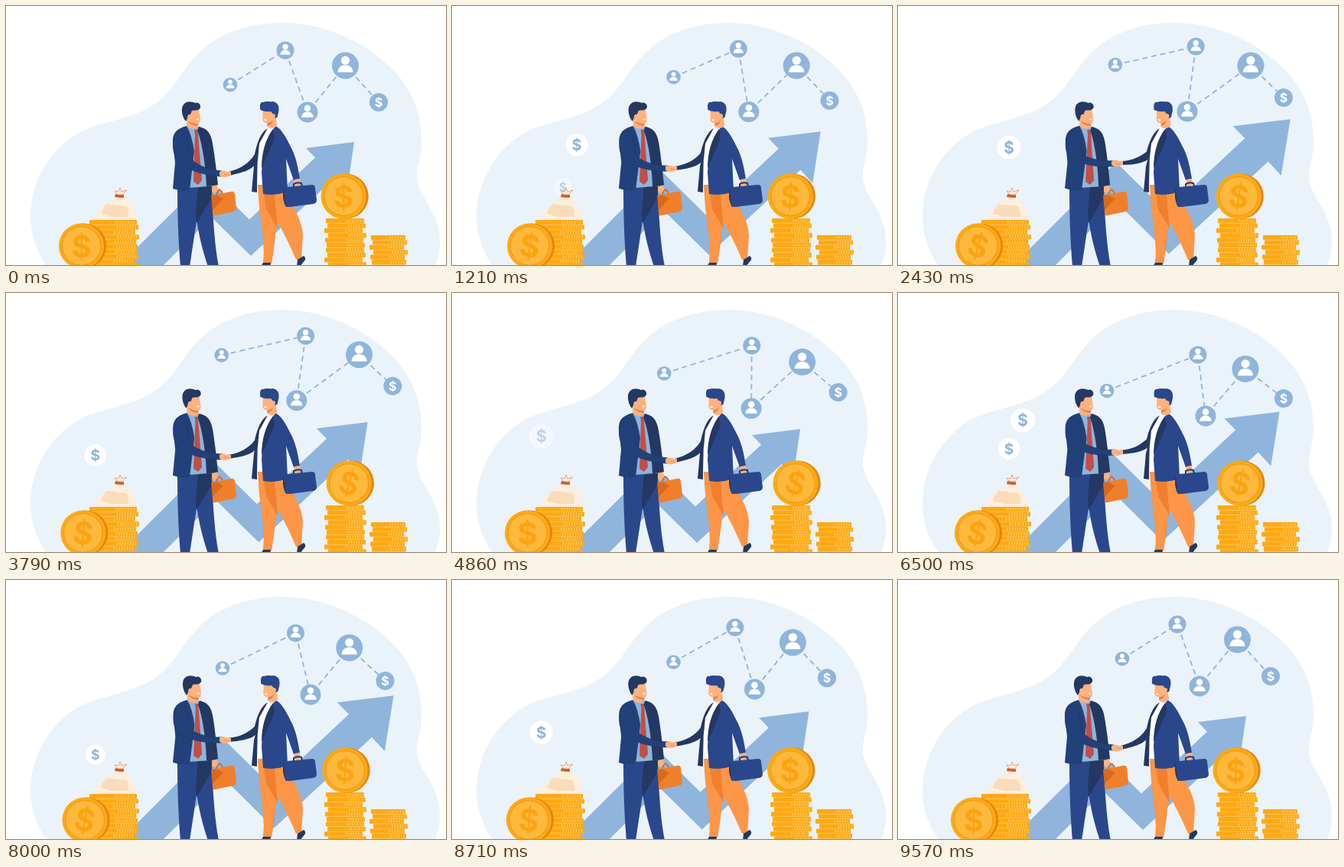
Recreate the animation shown at these times as an HTML page. Size 575 by 339 pixels, loop 9.64 s.

```html
<!DOCTYPE html>
<html lang="en">
<head>
<meta charset="utf-8">
<title>Business deal</title>
<style>
  html, body { margin: 0; width: 100%; height: 100%; overflow: hidden; background: #fff; }
  svg { display: block; width: 100vw; height: 100vh; }
  text { font-family: Inter, Roboto, sans-serif; font-weight: 700; text-anchor: middle; }
  .sky { fill: #8fb5dc; }
  .navy { fill: #233862; }
  .coat { fill: #22417a; }
  .blue { fill: #2b478b; }
  .skin { fill: #ffb27d; }
  .white { fill: #fff; }
  .links { fill: none; stroke: #8fb5dc; stroke-width: 1.8; stroke-dasharray: 7 5; }
</style>
</head>
<body>
<svg viewBox="0 0 575 339">
  <path fill="#eaf2fa" d="M56 345C40 322 32 300 32 275C32 228 62 178 108 160C145 147 177 145 206 119C229 97 237 68 273 45C298 29 329 22 362 22C420 22 480 52 514 93C535 119 543 148 543 177C543 200 536 208 537 226C539 249 567 270 567 308C567 322 564 333 558 345Z"/>

  <polygon id="arrow" class="sky"/>

  <path id="links" class="links"/>
  <g id="nodes"></g>
  <g id="floats"></g>

  <g id="sack">
    <path fill="#fdeedd" d="M143 250H154C163 257 171 268 170 280H115C116 268 132 260 143 250Z"/>
    <path fill="#f9dcbc" d="M131 259L157 262C160 266 160 271 160 276H138L124 272C125 268 128 263 131 259Z"/>
    <path fill="#fdeedd" stroke="#e08a50" stroke-width=".7" d="M146 247L142 242L147 243L149 238L151 243L158 241L152 247Z"/>
    <path fill="#cf5f24" d="M143 246Q149 248 154 247L154 251Q148 251 142 250Z"/>
  </g>
  <g id="stacks"></g>

  <!-- left man -->
  <g id="legsL">
    <path class="blue" d="M224 237L252 236L250 275L240 341H228C225 308 224 270 224 237Z"/>
    <path class="blue" d="M249 237H269C270 270 272 310 278 341H264C256 318 251 296 248 270Z"/>
    <path class="navy" d="M251 236H269L268 252L249 284L248 270Z"/>
  </g>
  <g id="caseL">
    <path fill="none" stroke="#d96a1d" stroke-width="2" d="M275 247L277 241Q280 239 283 245"/>
    <path fill="#f07f2c" d="M269 248L294 243Q298 242 299 246L301 264Q301 268 298 269L274 274Q270 275 270 271Z"/>
    <path fill="#d96a1d" d="M268 248L274 247L284 252L270 267Z"/>
    <path class="skin" d="M269 234H276L277 241L273 245L269 243Z"/>
  </g>
  <g id="manL">
    <path class="sky" d="M236 157L254 158L264 236L239 238Z"/>
    <path fill="#c04f48" d="M246 162H250L251 168L256 228L251 234L245 230L247 168Z"/>
    <path class="coat" d="M236 157C224 160 217 166 218 179L221 205L218 239Q228 243 240 241L246 190Q243 169 236 157Z"/>
    <path class="navy" d="M252 158C264 160 268 168 270 180C273 198 275 216 277 234Q270 236 262 236C261 212 257 180 250 163Z"/>
    <path class="skin" d="M236 148L252 151L251 158Q244 164 236 157Z"/>
    <path fill="#e6824e" d="M238 151L251 153L250 157Q241 156 238 151Z"/>
    <path class="skin" d="M237 136H252L254 148Q254 154 249 154Q240 154 236 147Z"/>
    <path class="navy" d="M235 151C230 145 228 134 232 129C236 124 243 125 247 127C251 125 255 129 254 133C252 138 246 136 243 137L241 142Q237 141 237 147Z"/>
    <path class="white" d="M248 148L252 147.500Q251.500 151 248 148Z"/>
    <path id="armL" class="coat" stroke="#233862" stroke-width=".8"/>
  </g>

  <!-- right man -->
  <g id="legsR">
    <path fill="#f08030" d="M329 232L356 240L354 274C353 298 350 318 347 337H336C339 314 334 289 331 262Z"/>
    <path fill="#fd9646" d="M330 232H336Q345 250 355 284C350 305 349 320 347 337H336C339 314 334 289 331 262Z"/>
    <path fill="#fd9646" d="M337 243L368 241C371 262 387 276 388 300L386 332H379C372 314 356 283 346 268Z"/>
    <path fill="#f08030" d="M337 246L351 246L355 292L340 266Z"/>
    <path class="navy" d="M336 336H346L345 343H332ZM381 332L389 327Q394 331 388 336L384 341H380Z"/>
  </g>
  <g id="bodyR">
    <path class="white" d="M341 158L329 180L329 234L338 234L348 164Z"/>
    <path class="navy" d="M329 190L328 232V244L321 243L324 210Z"/>
    <path class="blue" d="M352 157C361 161 368 176 374 188C380 201 382 215 384 226L376 228L366 200L368 242Q355 249 336 246L334 218C335 195 341 174 352 157Z"/>
    <path class="navy" d="M349 161L351 173L340 199L334 212C334 192 339 174 349 161Z"/>
    <path class="skin" d="M377 227L384 226L385 233L380 237L376 233Z"/>
    <path fill="none" stroke="#233862" stroke-width="2" d="M376 237V233Q381 230 386 232L387 236"/>
    <path class="navy" d="M362 240L371 238L374 262L366 263Q363 259 362 250Z"/>
    <path class="blue" d="M363 241Q363 238 367 237L400 234Q404 234 404 238L406 254Q406 258 402 259L371 263Q366 263 365 259Z"/>
  </g>
  <path id="armR" class="navy"/>
  <g id="headR">
    <path class="skin" d="M343 148L353 145L355 156Q350 163 342 158Z"/>
    <path fill="#e6824e" d="M342 153L350 149L347 155L342 157Z"/>
    <path class="skin" d="M336.500 137H353L352 146Q348 154 341 153Q336 153 336 147Z"/>
    <path class="blue" d="M333 136C332 130 333 125 337 126C341 124 345 126 349 125C356 126 358 131 357 138L355 146L352 147Q354 140 349 141L347 138Q339 139 333 136Z"/>
    <path class="white" d="M338 148L342 149Q339 152 338 148Z"/>
  </g>
  <g id="hands" class="skin">
    <path d="M279 217Q284 214 289 217L294 217V222L288 224Q283 225 279 222Z"/>
    <path fill="none" stroke="#e6824e" stroke-width=".8" d="M285 220L291 221"/>
  </g>
  <g id="coins"></g>
</svg>
<script>
const $ = id => document.getElementById(id);
const TAU = Math.PI * 2;
const LOOP = 9640;

function add(parent, tag, attrs, text) {
  const el = document.createElementNS('http://www.w3.org/2000/svg', tag);
  for (const k in attrs) el.setAttribute(k, attrs[k]);
  if (text) el.textContent = text;
  parent.appendChild(el);
  return el;
}
const dollar = (parent, size, fill) =>
  add(parent, 'text', { y: size * 0.363, 'font-size': size, fill }, '$');
const move = (el, x, y, rest = '') => el.setAttribute('transform', `translate(${x} ${y}) ${rest}`);

const clamp = v => Math.min(1, Math.max(0, v));
const sine = p => (1 - Math.cos(Math.PI * clamp(p))) / 2;
const cubic = p => p < 0.5 ? 4 * p ** 3 : 1 - 4 * (1 - p) ** 3;
const mix = (a, b, p) => a + (b - a) * p;

// Stacks of coins
function stack(x, y, w, count) {
  for (let i = 0; i < count; i++) {
    const left = x + [2, 4, 0, 5, 1, 3][i % 6], top = y + i * 6.4;
    add($('stacks'), 'rect', { x: left, y: top, width: w, height: 6.2, rx: 1.3, fill: '#fda914' });
    add($('stacks'), 'path', {
      d: `M${left} ${top + 6.2}h${w}`, stroke: '#fec65a', 'stroke-width': 0.5
    });
    add($('stacks'), 'path', {
      d: `M${left + w * 0.55} ${top + 3}h${w * 0.42}`,
      stroke: '#fed27c', 'stroke-width': 3.4, 'stroke-dasharray': '1 2.4'
    });
  }
}
stack(107, 280, 62, 10);
stack(416, 278, 50, 10);
stack(475, 300, 45, 7);

// Large rolling coins
function coin() {
  const g = add($('coins'), 'g', {});
  add(g, 'circle', { cx: 1.6, r: 29.6, fill: '#e5850f' });
  add(g, 'circle', { cx: -1.4, r: 29.6, fill: '#fda914' });
  add(g, 'circle', { cx: -1.4, r: 25.3, fill: '#feb93d', stroke: '#ee970f', 'stroke-width': 1 });
  const face = add(g, 'g', {});
  dollar(face, 40, '#fba312');
  return { g, face };
}
const coinL = coin(), coinR = coin();
function roll(c, x, y, angle) {
  move(c.g, x, y);
  move(c.face, -1.4, 0, `rotate(${angle})`);
}

// Network nodes: radius, then one stop per key time
const stopTimes = [0, 3, 6.4, 9.6];
const nodes = [
  [9.3, [293, 103], [283, 74.5], [273, 128]],
  [11.5, [365, 58], [391.5, 52.5], [392, 81]],
  [13.5, [394, 139], [376.5, 137.8], [402, 161]],
  [17.5, [443.5, 78], [462.6, 78], [454, 99.5]],
  [12, [487, 126], [505.5, 119.5], [504, 138]]
].map(([r, ...stops], i) => {
  const el = add($('nodes'), 'g', {});
  add(el, 'circle', { r, class: 'sky' });
  if (i === 4) dollar(el, 16, '#fff');
  else {
    const icon = add(el, 'g', { class: 'white', transform: `scale(${r})` });
    add(icon, 'circle', { cy: -0.39, r: 0.32 });
    add(icon, 'path', { d: 'M-.57 .5C-.57 -.22 .57 -.22 .57 .5Z' });
  }
  return { r, stops, el };
});

function network(t) {
  const leg = t < stopTimes[1] ? 0 : t < stopTimes[2] ? 1 : 2;
  const p = sine((t - stopTimes[leg]) / (stopTimes[leg + 1] - stopTimes[leg]));
  const at = nodes.map(({ stops, el }) => {
    const a = stops[leg], b = stops[(leg + 1) % 3];
    const x = mix(a[0], b[0], p), y = mix(a[1], b[1], p);
    move(el, x, y);
    return [x, y];
  });
  let d = '';
  for (let i = 0; i < 4; i++) {
    const [x, y] = at[i], dx = at[i + 1][0] - x, dy = at[i + 1][1] - y;
    const len = Math.hypot(dx, dy), s = (nodes[i].r + 3) / len, e = 1 - nodes[i + 1].r / len;
    d += `M${x + dx * s} ${y + dy * s}L${x + dx * e} ${y + dy * e}`;
  }
  $('links').setAttribute('d', d);
}

// Rising dollars: x, base y, birth times
const floats = [
  [163, 232, 0.25, 4.95],
  [145, 247, 1.06, 5.72],
  [116.7, 256, 3, 7.55]
].map(([x, y, ...births]) => {
  const el = add($('floats'), 'g', {});
  add(el, 'circle', { r: 16, class: 'white' });
  dollar(el, 21.5, '#8fb5dc');
  return { x, y, births, el };
});

function rise(t) {
  for (const { x, y, births, el } of floats) {
    const age = t - (t >= births[1] ? births[1] : births[0]);
    const p = clamp(age / 2), e = 1 - (1 - p) ** 2;
    move(el, x, y - 68.7 * e, `scale(${(11 + 5 * e) / 16})`);
    el.setAttribute('opacity', Math.min(clamp(age / 0.3), clamp((2 - age) / 0.27)));
  }
}

// Arrow corners, short and long
const shortArrow = [
  [138, 349], [263, 225], [318, 279.5], [404, 198.5], [392, 186], [455, 178],
  [446, 240], [430.7, 224], [320, 327], [268.5, 276.5], [190, 355]
];
const longArrow = [
  [138, 352], [285, 204.5], [351, 269], [453.5, 173], [438, 157], [513, 148],
  [501, 222], [484, 203.500], [354, 324.5], [287, 258], [190, 355]
];
function arrow(grow) {
  const corners = shortArrow.map(([x, y], i) =>
    [mix(x, longArrow[i][0], grow), mix(y, longArrow[i][1], grow)]);
  $('arrow').setAttribute('points', corners.join(' '));
}

function arms(lift) {
  const hand = -14 * lift, mid = 0.7 * hand, elbow = 0.25 * hand;
  $('armL').setAttribute('d', `M223 164C216 178 217 193 226 ${204 + elbow}
    C238 ${216 + mid} 262 ${222 + mid} 281 ${223 + hand}L282 ${216 + hand}
    C262 ${214 + mid} 249 ${208 + mid} 241 ${199 + elbow}C237 187 239 172 232 164Z`);
  $('armR').setAttribute('d', `M342 160C333 165 328 179 325 ${194 + elbow}
    C318 ${206 + mid} 306 ${213 + mid} 291 ${217 + hand}L292 ${222 + hand}
    C308 ${218 + mid} 324 ${215 + mid} 329 ${202 + elbow}L331 180Z`);
  move($('hands'), 0, hand);
}

function draw(t) {
  const u = t % 4.8, p = u / 4.8, sway = (1 - Math.cos(TAU * p)) / 2;
  const peak = 2.55, fall = 2.15;
  arrow(u < peak ? sine(u / peak) : 1 - cubic(clamp((u - peak) / fall)));

  arms(sway);
  $('manL').setAttribute('transform', `rotate(${0.8 * sway} 247 240)`);
  move($('headR'), 1.5 * Math.cos(TAU * (p - 0.4)) + 0.5, 0);

  roll(coinL, 100 + 6 * sway, 314, 16 * sway);
  const far = (1 - Math.cos(TAU * t / 9.6)) / 2;
  roll(coinR, 442.5 + 8 * far, 249, 16 * far);

  network(t);
  rise(t);
}

function tick() {
  draw(Math.min(9.6, performance.now() % LOOP / 1000));
  requestAnimationFrame(tick);
}
tick();
</script>
</body>
</html>
```
